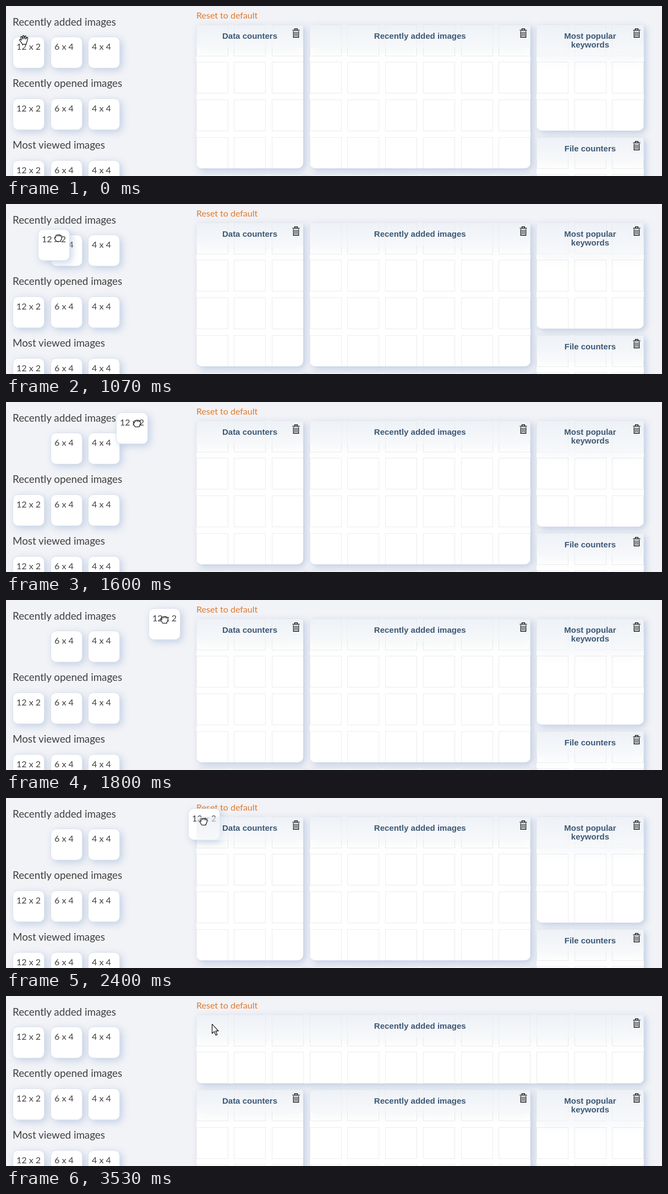
An HTML page that plays this animation: 1192 by 311 pixels, repeating every 4870 ms.

```html
<!DOCTYPE html>
<html lang="en">
<head>
<meta charset="utf-8">
<title>Dashboard widgets</title>
<style>
  html, body { margin: 0; width: 100%; height: 100%; overflow: hidden; }
  body { position: relative; background: #f2f3f7; color: #404040; font: 16px/20px Lato, sans-serif; }
  h2, .reset, .tile, .card, .cell, #cursor { position: absolute; box-sizing: border-box; margin: 0; }
  h2 { left: 12px; font-size: 18.8px; font-weight: 400; white-space: nowrap; }
  .reset { left: 346px; top: 7px; color: #e0782a; }
  .tile {
    width: 58px; height: 58px; padding: 7px 0 0 6px;
    background: #fff; border: 1px solid #dde2ea; border-radius: 10px;
    box-shadow: 4px 4px 13px rgba(140, 168, 208, .45); white-space: nowrap;
  }
  .card {
    overflow: hidden; background: #fff; border-radius: 4px 4px 10px 10px;
    box-shadow: 4px 4px 12px rgba(140, 168, 208, .5);
  }
  .cell { width: 58px; height: 58px; border: 1px solid #ececec; }
  .head {
    position: relative; z-index: 3; padding: 13.5px 40px 14px;
    background: linear-gradient(rgba(226, 233, 241, .6), rgba(243, 245, 248, .65));
    box-shadow: 0 8px 18px rgba(110, 130, 160, .06);
    color: #3d5876; font: bold 15px/16px "Liberation Sans", Arial, sans-serif; text-align: center;
  }
  .head svg { position: absolute; right: 6px; top: 7.5px; }
  #cursor { left: 0; top: 0; z-index: 4; overflow: visible; }
  #cursor path { fill: #fff; stroke: #000; stroke-width: 1.1; stroke-linejoin: round; }
</style>
</head>
<body>
<div class="reset">Reset to default</div>
<svg id="cursor" width="1" height="1">
  <g id="open"><path d="M-3.5 8C-4 5-8.5 1.5-8.5 0C-8.3-1.6-6.4-1.2-5 .8L-6.2-4.6C-6.5-6.6-4.6-7-4-5.2L-2.8-1.5L-2.7-6.8C-2.6-8.6-.6-8.6-.4-6.8L-.1-1.8L1-6.2C1.5-8 3.3-7.6 3.2-5.8L2.7-1.4L4.5-4.2C5.6-5.6 7.2-4.8 6.6-3.2C5.5 0 6 3 4 5.5V8Z"/></g>
  <g id="closed"><path d="M-3.5 6.5C-4 4-7 2-6.8 0C-6.6-1.2-5.4-1-4.6-.4L-5-3C-5-5.2-2.8-5.5-2.2-4.4C-1.6-6.4 .4-6.4 1-4.8C1.8-6.2 3.6-5.8 3.8-4.2C5.2-4.8 6.4-4 6.4-2.4C6.4 1 6 3 4.2 4.8V6.5Z"/><path d="M-2.2-4.4v2M1-4.8v2.2M3.8-4.2v2"/></g>
  <g id="arrow"><path d="M.5.5V17.5L4.4 13.8L7.2 20.8L9.8 19.7L7 12.9H12Z"/></g>
</svg>
<script>
const LOOP = 4870, STEP = 200 / 3, PITCH = 68.72, GAP = 11.2;
const GRAB = 8, LIFT = 13, INSERT = 38, DROP = 53;
const TRASH = `<svg width="14" height="17" fill="none" stroke="#000">
  <path d="M4.5 2.5V.6h5v1.9M.5 3.3h13M2.3 5v11.3h9.4V5" stroke-width="1.2"/>
  <path d="M4.7 6v8.5M7 6v8.5M9.3 6v8.5" stroke-width=".9"/></svg>`;

// Pointer path: step, x, y
const PATH = [
  [0, 33, 62], [3, 33, 76], [11, 33, 76], [12, 37, 78], [13, 46, 76],
  [18, 128, 52.5], [19, 139, 50], [23, 221, 39.5], [24, 238, 39],
  [26, 279.5, 36], [30, 313, 34.5], [32, 313, 34.5], [34, 344.5, 36.5],
  [37, 366, 46], [40, 374, 51]
];

// Widgets: title, column, row, columns wide, rows high
const WIDGETS = [
  ["Data counters", 0, 0, 3, 4],
  ["Recently added images", 3, 0, 6, 4],
  ["Most popular keywords", 9, 0, 3, 3],
  ["File counters", 9, 3, 3, 3],
  ["", 0, 4, 3, 2],
  ["", 3, 4, 6, 2]
];

const $ = id => document.getElementById(id);

function add(parent, tag, cls, x, y, html = "") {
  const el = document.createElement(tag);
  el.className = cls;
  el.style.left = x + "px";
  el.style.top = y + "px";
  el.innerHTML = html;
  return parent.appendChild(el);
}

const rowTop = row => 33.5 + PITCH * row;

function addCard([title, col, row, w, h]) {
  const card = add(document.body, "div", "card", 345.5 + PITCH * col, rowTop(row));
  card.style.width = w * PITCH - GAP + "px";
  card.style.height = h * PITCH - GAP + "px";
  for (let i = 0; i < w * h; i++)
    add(card, "div", "cell", (i % w) * PITCH, Math.floor(i / w) * PITCH);
  add(card, "div", "head", 0, 0, title + TRASH);
  return card;
}

const tiles = [];
["Recently added images", "Recently opened images", "Most viewed images"].forEach((name, i) => {
  add(document.body, "h2", "", 12, 19 + Math.floor(112.5 * i), name);
  ["12 x 2", "6 x 4", "4 x 4"].forEach((size, j) =>
    tiles.push(add(document.body, "div", "tile", Math.round(12 + 68.6 * j), 56 + 113 * i, size)));
});

const cards = WIDGETS.map(addCard);
const added = addCard(["Recently added images", 0, 0, 12, 2]);
const dragged = tiles[0];

function pointer(step) {
  const i = PATH.findIndex(p => p[0] >= step);
  if (i < 0) return PATH[PATH.length - 1].slice(1);
  if (i === 0) return PATH[0].slice(1);
  const [a, ax, ay] = PATH[i - 1], [b, bx, by] = PATH[i];
  const k = (step - a) / (b - a);
  return [ax + (bx - ax) * k, ay + (by - ay) * k];
}

function render(step) {
  const [x, y] = pointer(step).map(Math.round);
  $("cursor").style.transform = `translate(${x}px, ${y}px)`;
  const pose = step < GRAB ? "open" : step < DROP ? "closed" : "arrow";
  for (const id of ["open", "closed", "arrow"])
    $(id).style.display = id === pose ? "" : "none";

  // The tile trails the pointer by one step.
  const held = step >= LIFT && step < DROP;
  const [tx, ty] = pointer(step - 1);
  dragged.style.transform = held ? `translate(${Math.round(tx - 33)}px, ${Math.round(ty - 77)}px)` : "none";
  dragged.style.zIndex = held ? 2 : "auto";

  const inserted = step >= INSERT;
  added.style.display = inserted ? "" : "none";
  cards.forEach((card, i) => card.style.top = rowTop(WIDGETS[i][2] + (inserted ? 2 : 0)) + "px");
}

const start = performance.now();
let last = -1;
function tick() {
  const t = (performance.now() - start) % LOOP;
  const step = Math.floor((t + 3.5) / STEP);
  if (step !== last) render(last = step);
  requestAnimationFrame(tick);
}
tick();
</script>
</body>
</html>
```
